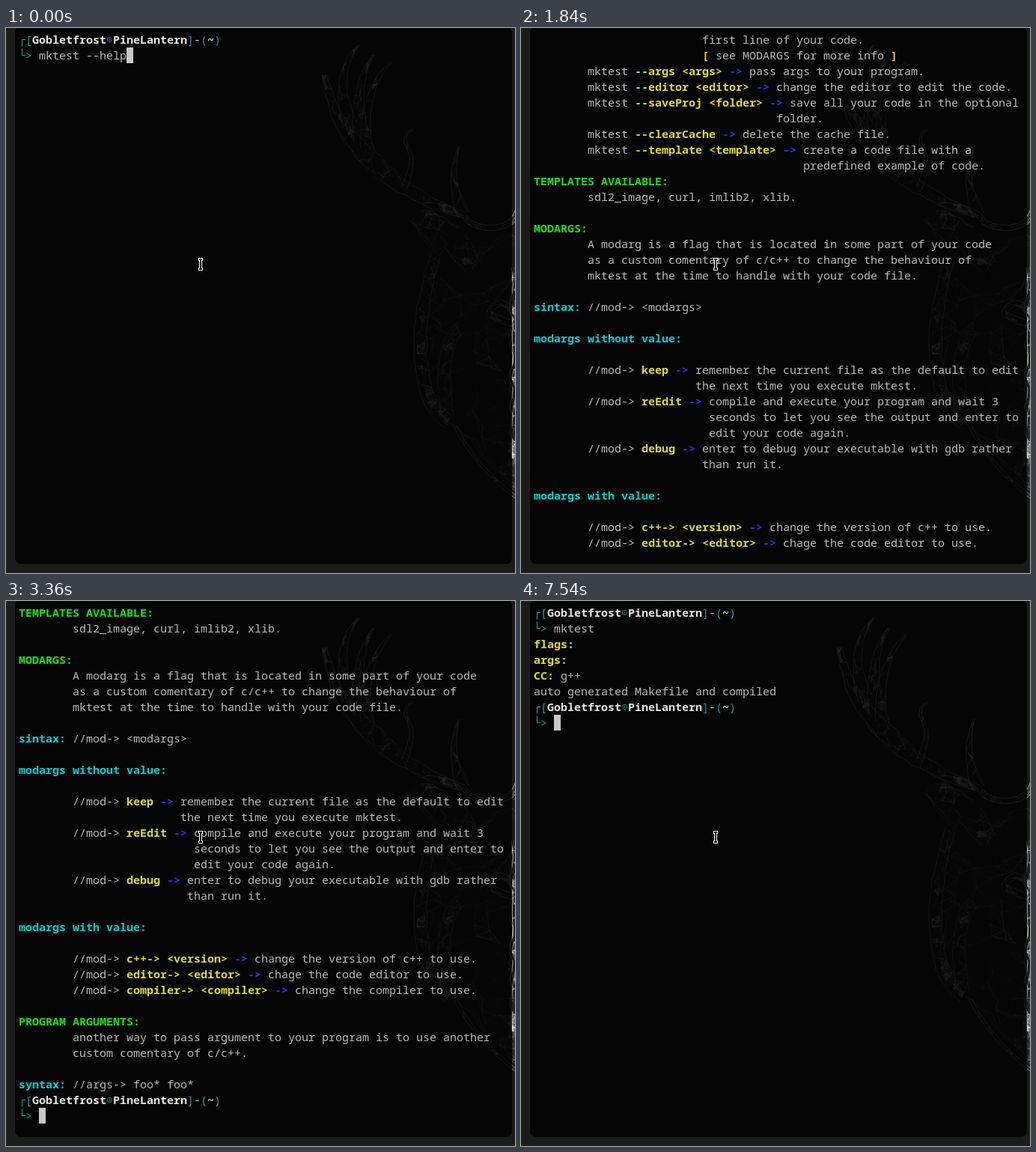
Recreate the animation shown at these times as an HTML page with a canvas. Size 680x728 px, loop 9790 ms.

```html
<!DOCTYPE html>
<html lang="en">
<head>
<meta charset="utf-8">
<title>Terminal session</title>
<style>
  html, body { margin: 0; width: 100%; height: 100%; overflow: hidden; background: #1c1c1a; }
  #stage { position: relative; width: 680px; height: 728px; overflow: hidden; background: #1c1c1a; }
  #stage > * { position: absolute; }
  #wallpaper { left: 0; top: 0; }
  #window { left: 12px; top: -2px; width: 664px; height: 718px; border-radius: 8px; background: rgba(0, 0, 0, .82); }
  #screen {
    left: 17px; top: 5px; width: 657px; height: 693px;
    font: 15px/21px "Noto Sans Mono", "DejaVu Sans Mono", monospace;
    font-variant-ligatures: none; color: #bcbcbc; white-space: pre;
  }
  #screen div { height: 21px; }
  #screen b { font-weight: 700; }
  .y { color: #dcdc32; }
  .g { color: #1fe01f; }
  .c { color: #00d2d2; }
  .b { color: #2a34ee; }
  .w { color: #e6e6e6; }
  .t { color: #16a39a; }
  .peace { display: inline-block; width: 9px; height: 21px; vertical-align: top; text-align: center;
           font: 10px/22px "DejaVu Sans", sans-serif; color: #16a39a; }
  .cursor { display: inline-block; width: 9px; height: 21px; vertical-align: top; background: #c8c8c8; color: #050505; }
  #pointer { left: 256px; top: 307px; }
</style>
</head>
<body>
<div id="stage">
  <canvas id="wallpaper" width="680" height="728"></canvas>
  <div id="window"></div>
  <div id="screen"></div>
  <svg id="pointer" width="8" height="17">
    <path fill="#fff" d="M1 0H7V4H6V13H7V17H1V13H2V4H1Z"/>
    <path fill="#000" d="M2 1H6V3H5V14H6V16H2V14H3V3H2Z"/>
  </svg>
</div>
<script>
const LOOP = 9790, ROWS = 33;

// ---- wallpaper: a wire-mesh stag built from tapering limbs ----
const ctx = document.getElementById('wallpaper').getContext('2d');
let seed = 41;
const random = () => (seed = (seed * 16807) % 2147483647) / 2147483647;
const spread = size => (random() * 2 - 1) * size;

function segment(a, b, alpha) {
  ctx.strokeStyle = `rgba(255,255,255,${alpha})`;
  ctx.beginPath();
  ctx.moveTo(...a);
  ctx.lineTo(...b);
  ctx.stroke();
}

// Scatters points around the spine, joins near ones and draws both rims.
function limb(spine, startRadius, endRadius, alpha) {
  const path = document.createElementNS('http://www.w3.org/2000/svg', 'path');
  path.setAttribute('d', spine);
  const length = path.getTotalLength(), girth = startRadius + endRadius;
  const reach = 9 + girth / 4;
  const at = (t, side) => {
    const p = path.getPointAtLength(t * length);
    const before = path.getPointAtLength(t * length - 1), after = path.getPointAtLength(t * length + 1);
    const angle = Math.atan2(after.y - before.y, after.x - before.x);
    const offset = side * (startRadius + (endRadius - startRadius) * t);
    return [p.x - Math.sin(angle) * offset, p.y + Math.cos(angle) * offset];
  };
  const points = Array.from({ length: 5 * length * girth / reach ** 2 }, () => at(random(), spread(1)));
  points.forEach((p, i) => points.slice(0, i).forEach(q => {
    const gap = Math.hypot(p[0] - q[0], p[1] - q[1]);
    if (gap < reach) segment(p, q, alpha * (1.1 - gap / reach));
  }));
  const pieces = Math.ceil(length / 12);
  for (const side of [-1, -1, 1, 1]) {
    let last = at(0, side);
    for (let i = 1; i <= pieces; i++) {
      const next = at(i / pieces, side * (1 + spread(.2)));
      segment(last, next, alpha);
      last = next;
    }
  }
}

ctx.lineWidth = .8;
// antler
limb('M612,250Q510,215 478,162', 4, 13, .32);
limb('M484,172Q440,135 425,62', 12, 3, .32);
limb('M460,130Q435,60 472,22', 10, 1, .28);
limb('M475,150Q462,80 491,36', 11, 1, .28);
limb('M482,160Q476,80 515,45', 8, 1, .28);
limb('M532,214Q548,178 537,160T544,135', 4, 1, .32);
limb('M611,250Q590,205 605,158', 8, 1, .35);
// ear, brow, eye
limb('M548,246L590,284', 14, 22, .3);
limb('M612,250Q620,268 650,267T686,238', 3, 4, .4);
limb('M600,285L625,320', 16, 12, .25);
limb('M645,382Q660,352 678,380T645,382', 4, 4, .3);
// cheek, fur, jaw
limb('M640,275L650,460', 60, 92, .24);
limb('M650,460L692,620', 90, 8, .22);
limb('M573,306Q548,390 555,450T592,526', 7, 9, .28);
limb('M608,400Q575,420 590,520', 8, 8, .22);
limb('M600,532Q630,590 686,630', 2, 2, .25);
// bright muzzle beyond the window edge
limb('M688,320V575', 13, 13, .75);

// ---- text: «kText» marks bold text of colour class k ----
const escapeHtml = s => s.replace(/&/g, '&amp;').replace(/</g, '&lt;').replace(/>/g, '&gt;');
const format = s => escapeHtml(s)
  .replace(/«([ygcbw])([^»]*)»/g, '<b class="$1">$2</b>')
  .replace(/‹([^›]*)›/g, '<span class="t">$1</span>')
  .replace('☮', '<span class="peace">☮</span>')
  .replace(/▮(.?)/, '<span class="cursor">$1</span>');

const TAB = ' '.repeat(8);
const item = (head, flag, first, ...rest) => {
  const indent = ' '.repeat(TAB.length + head.length + flag.length + 5);
  return [`${TAB}${head} «y${flag}» «b->» ${first}`, ...rest.map(line => indent + line)];
};
const prompt = (typed, cursor = '▮') => [
  '‹┌[›«wGobletfrost»☮«wPineLantern»‹]›-‹(›«w~»‹)›',
  `‹└>› ${typed}${cursor}`
];

const help = [
  ...prompt('mktest --help', ''),
  '', '', '«gUSAGE:»',
  TAB + "mktest «b->» for it's own create a test.cpp file with a Makefile.",
  ...item('mktest', '--new <name>', 'create a new file with a optional name.'),
  ...item('mktest', '--keep', 'if you create a new file, when you put this',
    'flag, it will write a comment modArg at the',
    'first line of your code.',
    '«y[» see MODARGS for more info «y]»'),
  ...item('mktest', '--args <args>', 'pass args to your program.'),
  ...item('mktest', '--editor <editor>', 'change the editor to edit the code.'),
  ...item('mktest', '--saveProj <folder>', 'save all your code in the optional'),
  ' '.repeat(36) + 'folder.',
  ...item('mktest', '--clearCache', 'delete the cache file.'),
  ...item('mktest', '--template <template>', 'create a code file with a',
    'predefined example of code.'),
  '«gTEMPLATES AVAILABLE:»',
  TAB + 'sdl2_image, curl, imlib2, xlib.',
  '',
  '«gMODARGS:»',
  TAB + 'A modarg is a flag that is located in some part of your code',
  TAB + 'as a custom comentary of c/c++ to change the behaviour of',
  TAB + 'mktest at the time to handle with your code file.',
  '',
  '«csintax:» //mod-> <modargs>',
  '',
  '«cmodargs without value:»',
  '',
  ...item('//mod->', 'keep', 'remember the current file as the default to edit',
    'the next time you execute mktest.'),
  ...item('//mod->', 'reEdit', 'compile and execute your program and wait 3',
    'seconds to let you see the output and enter to',
    'edit your code again.'),
  ...item('//mod->', 'debug', 'enter to debug your executable with gdb rather',
    'than run it.'),
  '',
  '«cmodargs with value:»',
  '',
  ...item('//mod->', 'c++-> <version>', 'change the version of c++ to use.'),
  ...item('//mod->', 'editor-> <editor>', 'chage the code editor to use.'),
  ...item('//mod->', 'compiler-> <compiler>', 'change the compiler to use.'),
  '',
  '«gPROGRAM ARGUMENTS:»',
  TAB + 'another way to pass argument to your program is to use another',
  TAB + 'custom comentary of c/c++.',
  '',
  '«csyntax:» //args-> foo* foo*'
];

const code = ['▮#include <iostream>', '', 'int main(int argc, char **argv)', '{', '    return 0;', '}'];
const editor = [
  ...code,
  ...Array(ROWS - 1 - code.length).fill('«b~»'),
  '"test.cpp" 6L, 70B'.padEnd(54) + '1,1'.padEnd(15) + 'All'
];

const result = [
  ...prompt('mktest', ''),
  '«yflags:»', '«yargs:»', '«yCC:» g++',
  'auto generated Makefile and compiled',
  ...prompt('')
];

// ---- timeline ----
const helpView = (typed, scroll = 0) => {
  const lines = [...help, ...prompt(typed)];
  const first = lines.length - ROWS - scroll;
  return lines.slice(first, first + ROWS);
};

const steps = [];
const show = (time, lines) => steps.push({ time, lines });
let typed = '';

function scroll(start, gap, from, to) {
  for (let n = from; n <= to; n++) show(start + (n - from) * gap, helpView('', n));
}

// '<' is a backspace
function type(start, gap, keys, view) {
  [...keys].forEach((key, i) => {
    typed = key === '<' ? typed.slice(0, -1) : typed + key;
    show(start + i * gap, view(typed));
  });
}

show(0, prompt('mktest --help'));
show(550, helpView(''));
scroll(1240, 90, 2, 3);
scroll(1470, 90, 4, 4);
scroll(1560, 46, 5, 8);
scroll(1840, 40, 9, 13);
scroll(2040, 60, 14, 18);
show(3360, helpView(''));
type(3400, 150, 'ck', helpView);
type(3980, 360, '<e', helpView);
type(4550, 82, '<<clea', helpView);
type(5110, 0, 'r', helpView);
typed = '';
show(5440, prompt(''));
type(5720, 83, 'mkte', prompt);
type(6220, 110, 'st', prompt);
show(6540, editor);
show(7540, result);

const screenBox = document.getElementById('screen');
const started = performance.now();
let shown = null;

function tick() {
  const now = (performance.now() - started) % LOOP;
  const { lines } = steps.findLast(step => step.time <= now);
  if (lines !== shown) {
    shown = lines;
    screenBox.innerHTML = lines.map(line => `<div>${format(line)}</div>`).join('');
  }
  requestAnimationFrame(tick);
}
tick();
</script>
</body>
</html>
```
